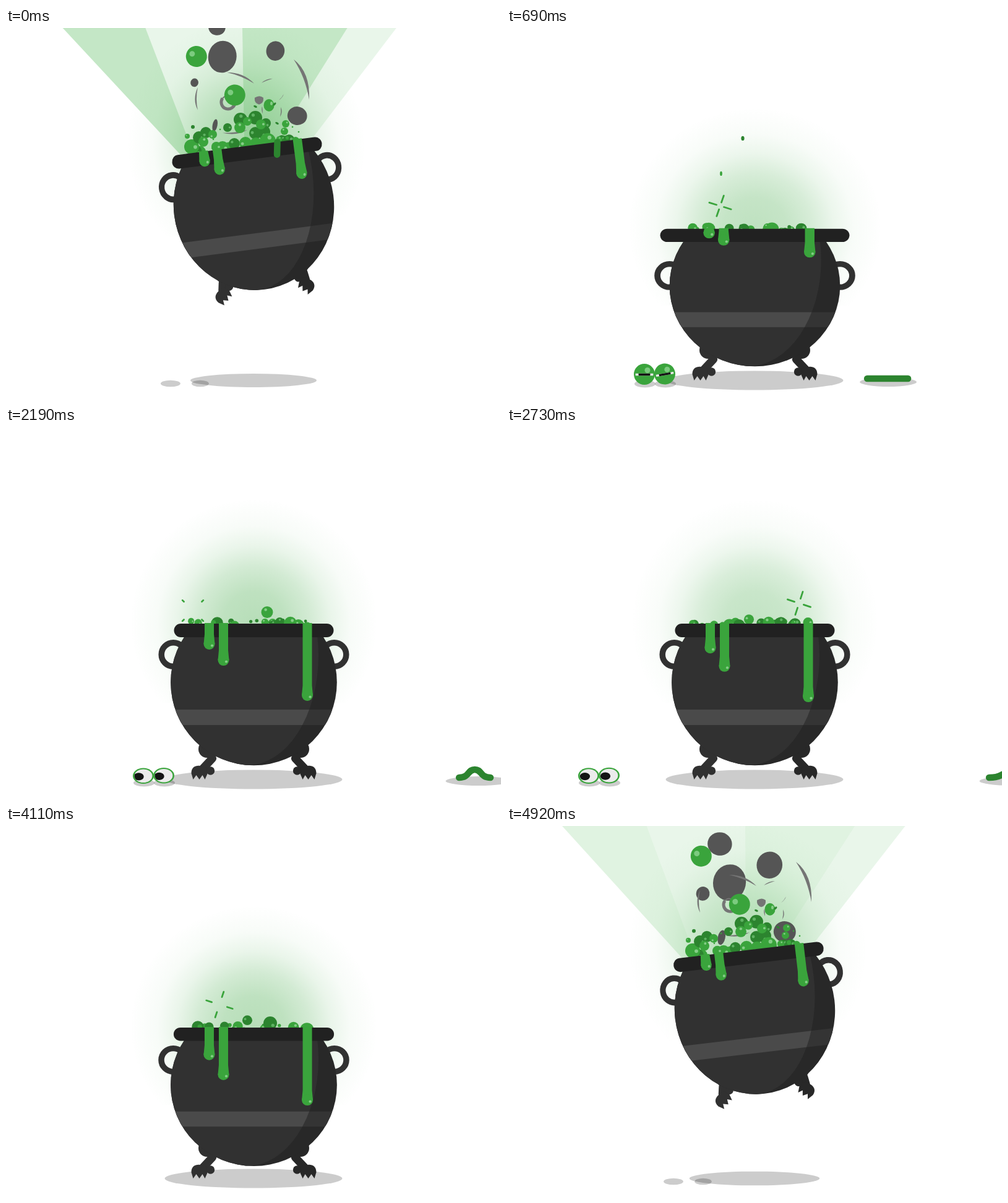
An HTML page with a canvas that plays this animation: 800 px wide and 600 px high, repeating every 4.95 s.

```html
<!DOCTYPE html>
<html lang="en">
<head>
<meta charset="utf-8">
<title>Bubbling cauldron</title>
<style>
html, body { margin: 0; width: 100%; height: 100%; overflow: hidden; background: #fff; }
canvas { display: block; }
</style>
</head>
<body>
<canvas id="stage" width="800" height="600"></canvas>
<script>
const ctx = document.getElementById('stage').getContext('2d');
const LOOP = 4950, TAU = Math.PI * 2, CX = 400.5, CY = 413;
const LIGHT = '#3aa43c', DARK = '#2c842f', IRON = '#313131', SHADE = '#282828', RIM = '#212121';

const clamp = v => Math.max(0, Math.min(1, v));
const ramp = (t, a, b) => clamp((t - a) / (b - a));
const smooth = (t, a, b) => { const p = ramp(t, a, b); return p * p * (3 - 2 * p); };
const mix = (a, b, p) => a + (b - a) * p;
const rnd = n => { const v = Math.sin(n * 127.1 + 3.7) * 43758.5453; return v - Math.floor(v); };

function ell(x, y, rx, ry, fill, rot = 0) {
  if (rx <= 0 || ry <= 0) return;
  ctx.fillStyle = fill;
  ctx.beginPath();
  ctx.ellipse(x, y, rx, ry, rot, 0, TAU);
  ctx.fill();
}
const dot = (x, y, r, fill) => ell(x, y, r, r, fill);
const shadow = (x, y, rx, ry) => ell(x, y, rx, ry, 'rgba(0,0,0,.2)');
function line(d, width, color, cap = 'round') {
  ctx.lineWidth = width;
  ctx.strokeStyle = color;
  ctx.lineCap = ctx.lineJoin = cap === 'butt' ? 'miter' : 'round';
  ctx.lineCap = cap;
  ctx.stroke(new Path2D(d));
}
function group(draw) { ctx.save(); draw(); ctx.restore(); }

function bubble(x, y, r, dark, seed) {
  dot(x, y, r, dark ? DARK : LIGHT);
  if (r < 4) return;
  const a = rnd(seed) * TAU;
  dot(x + r * .5 * Math.cos(a), y + r * .5 * Math.sin(a), r * .24, dark ? '#5fb263' : '#85cd87');
}

// Pose of the pot; e is time relative to the loop seam, negative before it.
function potPose(t, e) {
  let c = CY, angle = 0;
  if (e > -213 && e < 100) c = 273 + .00143 * (e - 100) ** 2;
  else if (e >= 100 && e < 520) c = 273 + 140 * ((e - 100) / 420) ** 2;
  if (e > -213 && e < 520) {
    const up = 1 - (1 - ramp(e, -213, 130)) ** 2;
    angle = -8.6 * up * (1 - smooth(e, 130, 520)) * Math.PI / 180;
  }
  const air = smooth(e, -213, -150) * (1 - smooth(e, 420, 520)) * (e > -400 && e < 600);
  const release = e < 0 ? 1 - smooth(e, -270, -200) : 0;
  let q = 0, dip = 0;
  if (t > 520 && t < 3000) {
    const u = t - 520;
    q = 2.5 * Math.sin(Math.PI * u / 300) * Math.exp(-u / 200);
  } else if (t >= 3900) {
    q = 1.6 * smooth(t, 4000, 4500) ** 2 * (e < 0 ? release : 1);
    dip = smooth(t, 4000, 4140) * (e < 0 ? release : 1);
    angle += .02 * Math.sin((t - 4150) / 45) * smooth(t, 4150, 4400) * (e < 0 ? release : 1);
  }
  const squash = .028 * q + .025 * dip;
  return {
    c, angle, air, q,
    y: c + 134 * squash + 3 * dip,
    sx: 1 - .035 * air + .025 * q,
    sy: 1 + .02 * air - squash,
    ear: 27 * q + 3.5 * dip
  };
}
function inPot(p, draw) {
  group(() => {
    ctx.translate(CX, p.y);
    ctx.rotate(p.angle);
    ctx.scale(p.sx, p.sy);
    ctx.translate(-CX, -CY);
    draw();
  });
}

function glow(t) {
  const a = .33 + .05 * Math.cos(TAU * (t - 2190) / 1920);
  const g = ctx.createRadialGradient(CX, 316, 0, CX, 316, 200);
  [[0, 1], [.25, .9], [.45, .62], [.62, .3], [.78, .1], [1, 0]]
    .forEach(([s, k]) => g.addColorStop(s, `rgba(66,168,70,${a * k})`));
  ctx.fillStyle = g;
  ctx.fillRect(200, 116, 401, 330);
}

const EDGES = [[-111, -.754], [-89, -.256], [-3, .119], [50, .87], [113, 1.045]];
function beams(e) {
  const fade = smooth(e, -200, -150) * (1 - ramp(e, 60, 400));
  if (fade <= 0 || e < -200) return;
  const strong = .15 + .15 * Math.cos(TAU * e / 120);
  for (let i = 0; i < 4; i++) {
    const [a, sa] = EDGES[i], [b, sb] = EDGES[i + 1];
    ctx.fillStyle = `rgba(58,175,66,${fade * (i % 2 ? .11 : strong)})`;
    ctx.beginPath();
    ctx.moveTo(CX + a, 318);
    ctx.lineTo(CX + a + sa * 600, -282);
    ctx.lineTo(CX + b + sb * 600, -282);
    ctx.lineTo(CX + b, 318);
    ctx.fill();
  }
}

// x, y, rx, ry, vx, vy, shrink per ms
const PUFFS = [
  [341, 0, 14, 13, -.1, -1, .2], [350, 48, 23, 26, -.33, -1.5, .12], [435, 38, 15, 16, .37, -.87, .2],
  [305, 89, 6.5, 7, -.4, -.7, .15], [470, 143, 16, 15, .73, -.97, .07], [338, 158, 4, 10, -.3, -.77, .07]
];
const WISPS = [
  'M465 51Q492 72 490 116Q484 80 465 51', 'M357 72Q384 72 401 90Q380 77 357 72',
  'M310 96Q301 116 310 133Q306 116 310 96', 'M413 89Q421 82 431 82Q421 85 413 89',
  'M441 117Q447 113 449 107Q446 113 441 117', 'M444 128Q448 136 443 144Q445 136 444 128',
  'M414 127Q412 132 415 139Q415 132 414 127', 'M350 170Q374 175 390 165Q372 170 350 170',
  'M402 113Q410 108 416 113Q417 122 409 124Q401 122 402 113'
];
function smoke(e) {
  if (e < -150 || e > 350) return;
  const grow = smooth(e, -150, -70);
  for (const [x, y, rx, ry, vx, vy, s] of PUFFS) {
    const d = Math.max(-7, s * e);
    ell(x + vx * e, y + vy * e, (rx - d) * grow, (ry - d) * grow, '#555', .2);
  }
  const fade = smooth(e, -110, -40) * (1 - ramp(e, 40, 180));
  if (fade > 0) group(() => {
    ctx.globalAlpha = fade;
    ctx.translate(-.07 * e, -.24 * e);
    ctx.fillStyle = '#757575';
    WISPS.forEach(d => ctx.fill(new Path2D(d)));
    line('M350 114A11 11 0 1 0 370 121', 5, '#757575', 'butt');
    line('M350 114Q354 109 360 111', 2, '#757575');
  });
}

const SPLASH = [
  [300, 192, 12], [312, 177, 10, 1], [323, 169, 9, 1], [302, 160, 3, 1], [293, 175, 4], [334, 172, 7],
  [319, 184, 8], [358, 161, 7, 1], [379, 148, 11, 1], [403, 145, 11, 1], [416, 168, 11, 1],
  [420, 154, 8, 1], [403, 170, 10, 1], [378, 161, 9], [390, 151, 7], [412, 156, 8], [350, 193, 10],
  [369, 187, 9, 1], [387, 186, 10], [404, 187, 10], [423, 183, 13], [450, 167, 6], [452, 155, 6],
  [340, 192, 8], [468, 182, 6]
];
function splash(e, p) {
  const k = smooth(e, -210, -90) * (1 - smooth(e, 100, 480));
  if (e < -210 || k <= 0) return;
  group(() => {
    ctx.translate(0, p.y - 287);
    SPLASH.forEach(([x, y, r, dark], i) => bubble(x, 212 + (y - 212) * k, r * k, dark, i + 5));
    ell(425, 212 - 87 * k, 8.5 * k, 10 * k, LIGHT);
    ell(429, 212 - 90 * k, 2 * k, 3 * k, '#85cd87');
    for (const [x, y, a] of [[403, 127, .4], [434, 123, -.8], [438, 154, .5]])
      ell(x, 212 + (y - 212) * k, 3 * k, 1.6 * k, DARK, a);
    for (const [x, y] of [[463, 160], [473, 168], [335, 180], [346, 164]])
      dot(x, 212 + (y - 212) * k, 1.3 * k, LIGHT);
  });
}

// start, x, y, rotation, dark, radius of the bubble that bursts
const POPS = [
  [540, 346, 280, 18, 0, 10], [1030, 448, 305, 45, 1, 8], [1107, 324.5, 270, 45, 1, 9],
  [1470, 419, 276, 45, 1, 7], [1640, 500, 290, 20, 0, 11], [1914, 302, 297, 45, 0, 8],
  [2430, 422, 268, 45, 0, 9.5], [2560, 472, 285, 18, 0, 11], [3075, 391, 260, 43, 0, 10],
  [3500, 477, 285, 45, 1, 12], [3640, 425, 278, 18, 0, 7], [3890, 345, 280, 18, 0, 10],
  [4330, 390, 285, 45, 1, 8], [4400, 427, 280, 30, 1, 11]
];
function brew(t) {
  for (let i = 0; i < 26; i++) {
    const n = 4 + i % 4, life = t / LOOP * n + rnd(i + .3), p = life % 1;
    const id = i * 9 + Math.floor(life) % n;
    const r = (4 + 7.5 * rnd(id + 50.5)) * Math.sqrt(Math.sin(Math.PI * p));
    bubble(296 + 192 * rnd(id), 326 - 13 * p, r, rnd(id + 20.2) > .5, id);
  }
  for (const [start, x, y, , dark, r] of POPS) {
    const p = (t - start) / 470 + 1;
    if (p > 0 && p < 1) bubble(x, mix(330, y, p), r * Math.min(1, p * 3), dark, x);
  }
}
function sparks(t) {
  for (const [start, x, y, rot, dark] of POPS) {
    const p = (t - start) / 300;
    if (p <= 0 || p >= 1) continue;
    const outer = 24 * (1 - (1 - p) ** 2), inner = 24 * p * p;
    group(() => {
      ctx.translate(x, y);
      ctx.rotate(rot * Math.PI / 180);
      for (let i = 0; i < 4; i++) {
        line(`M${inner} 0H${outer}`, 2.8, dark ? DARK : LIGHT);
        ctx.rotate(TAU / 4);
      }
    });
  }
}

function leg(side, air) {
  const color = side < 0 ? IRON : SHADE;
  const at = (x0, y0, x1, y1) => [mix(x0, x1, air), mix(y0, y1, air)];
  const hip = at(-75.5, 108, -61, 106), knee = at(-67, 123, -66, 118), ankle = at(-82, 139, -68, 130);
  group(() => {
    ctx.scale(-side, 1);
    dot(...hip, 14, color);
    line(`M${hip}L${knee}L${ankle}`, 13, color);
    ctx.translate(...ankle);
    ctx.rotate(-.73 * air);
    ctx.fillStyle = color;
    ctx.fill(new Path2D('M-19 8C-19-2-12-5-5-4L3-3Q9 2 7 9L3 18L-1 11L-6 18L-11 11L-16 18Z'));
    dot(12, 4, 6.7, color);
  });
}

const DRIP_TIMES = [0, 690, 1320, 2190, 3240, 4560, 4920, 4950];
const DRIPS = [
  [328.5, 4, -4, -1.5, 22, 34, 34, 5, 4],
  [351.5, 20, 8, 11, 48, 67, 67, 23, 20],
  [487, 43, 28, 36, 105, 109, 109, 48, 43]
];
function drip([x, ...len], t) {
  let i = 0;
  while (t >= DRIP_TIMES[i + 1]) i++;
  const y = 329 + mix(len[i], len[i + 1], ramp(t, DRIP_TIMES[i], DRIP_TIMES[i + 1]));
  ctx.fillStyle = LIGHT;
  ctx.fill(new Path2D(`M${x - 7.5} 317h15V${Math.max(318, y - 16)}L${x + 9} ${y}H${x - 9}L${x - 7.5} ${Math.max(318, y - 16)}Z`));
  dot(x, y, 9, LIGHT);
  dot(x + 4.5, y + 2.5, 2.1, '#85cd87');
}

function pot(t, p) {
  group(() => {
    ctx.translate(CX, p.c);
    ctx.rotate(p.angle);
    leg(-1, p.air);
    leg(1, p.air);
  });
  inPot(p, () => {
    for (const s of [-1, 1]) {
      ctx.lineWidth = 9.5;
      ctx.strokeStyle = IRON;
      ctx.beginPath();
      ctx.arc(CX + s * (130 + 4 * p.q), 368 + p.ear, 19.3, 0, TAU);
      ctx.stroke();
    }
    group(() => {
      ctx.beginPath();
      ctx.rect(200, 329, 400, 300);
      ctx.clip();
      ctx.beginPath();
      ctx.arc(CX, CY, 134.3, 0, TAU);
      ctx.clip();
      ctx.fillStyle = SHADE;
      ctx.fillRect(200, 320, 400, 300);
      ctx.fillStyle = '#343434';
      ctx.fillRect(200, 457, 400, 25);
      ctx.beginPath();
      ctx.ellipse(390, 370, 115, 177, 0, 0, TAU);
      ctx.rect(200, 320, 190, 300);
      ctx.clip();
      ctx.fillStyle = IRON;
      ctx.fillRect(200, 320, 400, 300);
      ctx.fillStyle = '#4a4a4a';
      ctx.fillRect(200, 457, 400, 25);
    });
    const half = 129 * (1 + .15 * p.q - .02 * p.air);
    ctx.fillStyle = RIM;
    ctx.beginPath();
    ctx.roundRect(CX - half, 318, half * 2, 22, 11);
    ctx.fill();
    DRIPS.forEach(d => drip(d, t));
  });
}

const EYES = [
  { x: 222, y: 560, land: 430, rot: 0, sx: 266, sr: 16, px: 308, py: 46, v: 0, g: .00278 },
  { x: 255, y: 559.5, land: 575, rot: -.17, sx: 314, sr: 14, px: 370, py: 109, v: -.53, g: .002286 }
];
function eyePose(eye, t, e) {
  const o = { x: eye.x, y: eye.y, sx: 1, sy: 1, rot: eye.rot, lift: 0 };
  if (e < eye.land) {
    o.x = eye.px - .2 * e;
    o.y = eye.py + eye.v * e + eye.g * e * e + (e < 0 ? 4.9e-7 * e ** 4 : 0);
    o.rot = mix(-1.68, eye.rot, ramp(e, 0, eye.land));
    return o;
  }
  const bounce = ramp(t, eye.land, eye.land + 100), a = ramp(t, 2240, 2680), b = ramp(t, 2800, 3300);
  o.lift = 24 * bounce * (1 - bounce) + 180 * a * (1 - a) + 260 * b * (1 - b);
  o.x -= 90 * a + 200 * b;
  const crouch = smooth(t, 2050, 2190) * (1 - smooth(t, 2220, 2290))
    + smooth(t, 2660, 2740) * (1 - smooth(t, 2780, 2850));
  const stretch = Math.max(.6 * Math.sin(Math.PI * a), smooth(t, 2800, 2920));
  o.sx = 1 + .25 * stretch;
  o.sy = 1 - .25 * crouch - .35 * stretch;
  o.y += 17 * .25 * crouch - o.lift;
  if (t > 800) o.rot = eye.rot * (1 - smooth(t, 800, 1000));
  return o;
}
function drawEye(eye, t, e) {
  const o = eyePose(eye, t, e), open = e < 0 ? 0 : smooth(t, 640, 900);
  const look = smooth(t, 1000, 1220), left = smooth(t, 1750, 1950), back = smooth(t, 2700, 2850);
  const px = 6 * look - 13.5 * left + 13 * back, py = -2 * look + 3.5 * left - 1.5 * back;
  group(() => {
    ctx.translate(o.x, o.y);
    ctx.scale(o.sx, o.sy);
    ctx.rotate(o.rot);
    dot(0, 0, 17, LIGHT);
    if (open < .8) dot(5, -6.5, 4.5, '#7ccb7f');
    if (open <= 0) return;
    ctx.beginPath();
    ctx.rect(-17, -17 * open + .5, 34, 34 * open);
    ctx.clip();
    ctx.beginPath();
    ctx.arc(0, 0, 14.4, 0, TAU);
    ctx.clip();
    dot(0, 0, 15, '#ebebeb');
    dot(px, py, 9.5 - 1.3 * left, '#141414');
  });
}
function eyeShadow(eye, t, e) {
  const p = e / eye.land;
  if (p < 1) return shadow(mix(eye.sx, eye.x, p), 575, mix(eye.sr, 17, p), mix(5.3, 6, p));
  const o = eyePose(eye, t, e), k = 1 - Math.min(.8, o.lift / 40);
  shadow(o.x + 1, 575.5, 17 * k, 6 * k);
}

function worm(t) {
  if (t > 3400) return;
  const w = ramp(t, 0, 540), fly = w < 1;
  const x = fly ? mix(438, 601, w) : 615 + .095 * (t - 690);
  const y = fly ? 195 + 372 * w * w - 160 * w * (1 - w) : 567;
  const h = fly ? 0 : (1 - Math.cos(TAU * (t - 690) / 630)) / 2 * smooth(t, 690, 900);
  const half = mix(10, mix(33, 35, smooth(t, 690, 1300)), w) - 11 * h;
  const grow = smooth(w, .4, 1);
  if (grow > 0) shadow(x + 1 + .0033 * Math.max(0, t - 690), 572.5, grow * mix(46, 53, ramp(t, 690, 2190)), grow * 7.5);
  group(() => {
    ctx.translate(x, y);
    ctx.rotate(1.6 * (1 - w));
    line(`M${-half} 0C-8 0-12 ${-15 * h} 0 ${-15 * h}S8 0 ${half} 0`, 10.5, DARK);
  });
}

function drops(t) {
  if (t < 420 || t > 1050) return;
  const fall = .4 * (t - 690);
  if (178 + fall < 318) ell(381, 178 + fall, 2.6, 3.6, DARK);
  if (235 + fall < 318) ell(346, 235 + fall, 1.9, 3.7, LIGHT);
}

function frame(now) {
  const t = now % LOOP, e = t > 4500 ? t - LOOP : t, p = potPose(t, e);
  const eyesOut = e > -150 && t !== e || t === e && t < 3400;
  ctx.fillStyle = '#fff';
  ctx.fillRect(0, 0, 800, 600);
  inPot(p, () => { beams(e); glow(t); });

  const k = 1 - .289 * (CY - p.c) / 126;
  shadow(400, 570, 143.5 * k, 15.5 * k);
  if (eyesOut) EYES.forEach(eye => eyeShadow(eye, t, e));

  smoke(e);
  inPot(p, () => {
    ctx.beginPath();
    ctx.rect(0, -400, 800, 730);
    ctx.clip();
    brew(t);
  });
  splash(e, p);
  drops(t);
  const behind = e < 100;
  if (eyesOut && behind) EYES.forEach(eye => drawEye(eye, t, e));
  pot(t, p);
  inPot(p, () => sparks(t));
  worm(t);
  if (eyesOut && !behind) EYES.forEach(eye => drawEye(eye, t, e));
}

const begin = performance.now();
(function tick() {
  frame(Math.max(0, performance.now() - begin));
  requestAnimationFrame(tick);
})();
</script>
</body>
</html>
```
